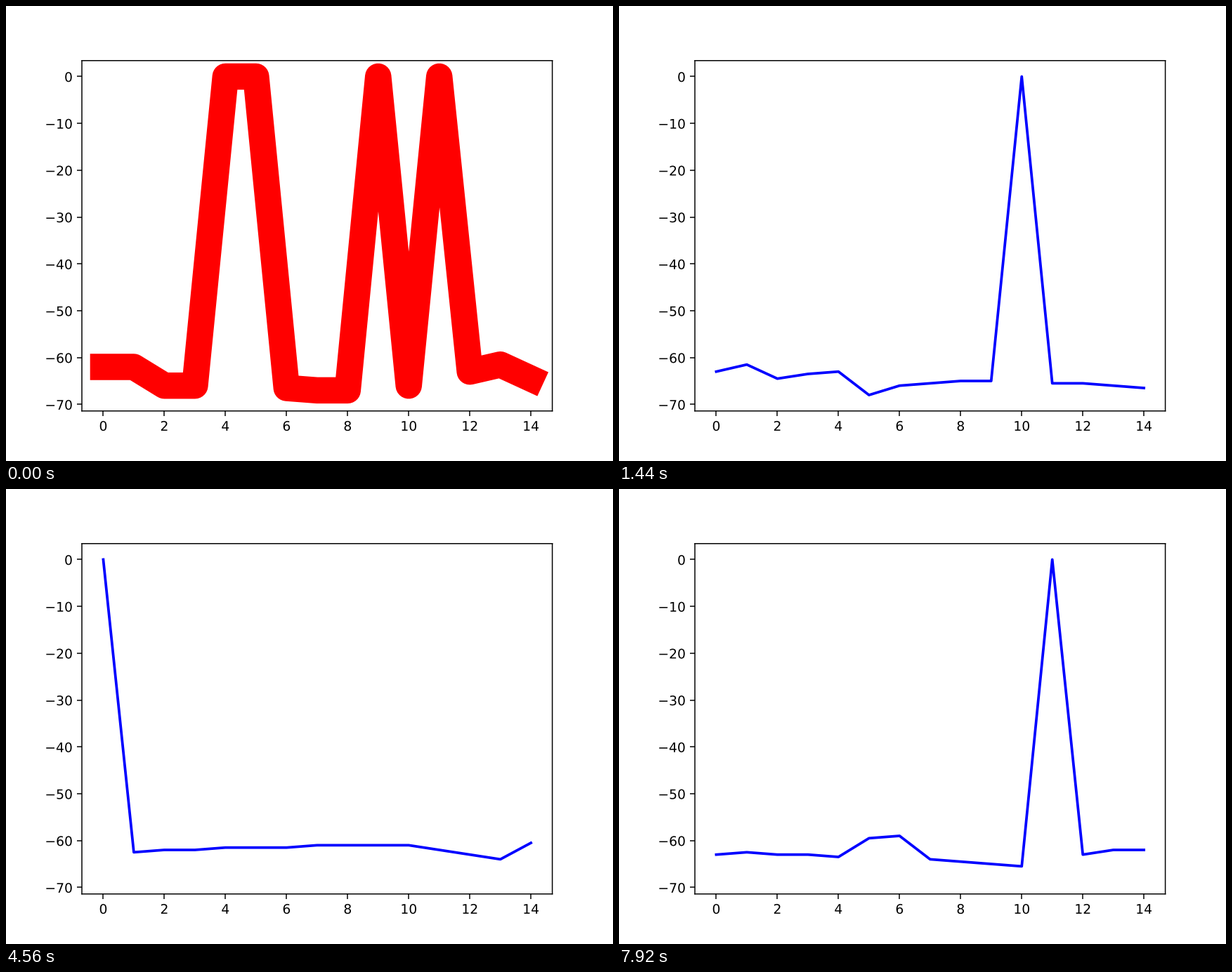
A matplotlib script that plays this animation: 864x648 px, repeating every 8000 ms.

```python
import numpy as np
import matplotlib.pyplot as plt
from matplotlib.animation import FuncAnimation
from matplotlib.patheffects import Normal

WINDOW = 15       # samples visible at once
TICK = 40         # ms per animation frame
HOLD = 3          # frames per sample step
LOOP = 8000       # ms
FRAMES = LOOP // TICK
ALARM_COUNT = 4   # dropouts (zero readings) in view that trigger the alarm look

# Turning points of the signal level: (sample, level)
TURNS = [
    (1, -62), (2, -66), (8, -67), (10, -66), (13, -61.5), (14, -64.3),
    (16, -63), (17, -68), (18, -66), (21, -64.8), (26, -66.3), (29, -62),
    (33, -63.7), (34, -66), (40, -62), (48, -60.8), (51, -64), (52, -60.5),
    (54, -58.5), (57, -58.5), (58, -64), (59, -58), (60, -58), (61, -65),
    (67, -62.5), (70, -63.5), (71, -59.5), (72, -59), (73, -64), (76, -65.3),
    (79, -62),
]
DROPOUTS = [4, 5, 9, 11, 22, *range(36, 39), *range(63, 66), 77]


def make_signal():
    """Levels between the turns in half-unit steps, with dropouts at zero."""
    samples = np.arange((FRAMES - 1) // HOLD + WINDOW)
    level = np.round(2 * np.interp(samples, *zip(*TURNS))) / 2
    level[DROPOUTS] = 0
    return level


signal = make_signal()
fig, ax = plt.subplots(figsize=(6.4, 4.8), dpi=135)
ax.set_xlim(-0.7, WINDOW - 0.3)
ax.set_ylim(-71.4, 3.4)
ax.set_xticks(range(0, WINDOW, 2))
ax.set_yticks(range(-70, 1, 10))

# Smooth sub-pixel edges for the frame and the labels
for spine in ax.spines.values():
    spine.set_snap(False)
for label in ax.get_xticklabels() + ax.get_yticklabels():
    label.set_path_effects([Normal()])

line, = ax.plot(np.arange(WINDOW), signal[:WINDOW])


def update(i):
    start = i // HOLD
    view = signal[start:start + WINDOW]
    alarm = np.count_nonzero(view == 0) >= ALARM_COUNT
    line.set_ydata(view)
    line.set_color("red" if alarm else "blue")
    line.set_linewidth(20 if alarm else 2)
    return line,


anim = FuncAnimation(fig, update, frames=FRAMES, interval=TICK,
                     init_func=lambda: update(0), repeat=True, repeat_delay=0)
plt.show()
```
